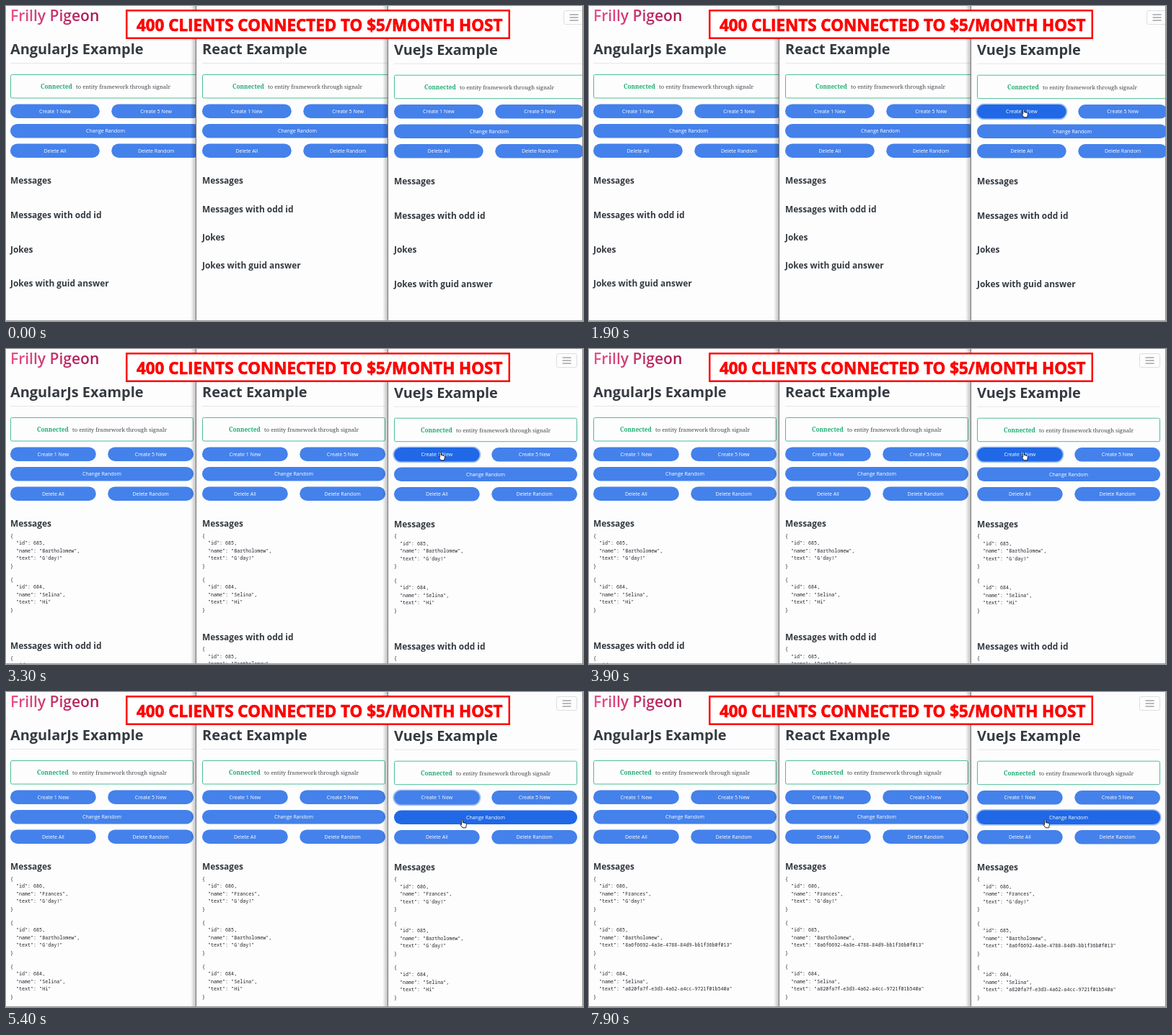
An HTML page with a canvas for the animation above (8 s loop, 800 by 438 pixels).

```html
<!DOCTYPE html>
<html lang="en">
<head>
<meta charset="utf-8">
<title>Live data demo</title>
<style>
html, body { margin: 0; width: 100%; height: 100%; overflow: hidden; background: #fdfdfe; }
canvas { display: block; }
</style>
</head>
<body>
<canvas id="stage" width="800" height="438"></canvas>
<script>
const ctx = document.getElementById('stage').getContext('2d');
const LOOP = 8000;
const SANS = '"Open Sans", "Noto Sans", sans-serif';
const SERIF = '"Noto Serif", "Liberation Serif", serif';
const MONO = '"Noto Sans Mono", "DejaVu Sans Mono", monospace';
const BLUE = '#4481eb', DARK_BLUE = '#2068e6', INK = '#343a40';
const LINE = 10.5, BLOCK = 61.1;

// Times of the clicks and of the resulting updates
const HOVER = 900, ADDED = [2000, 3300, 4700], REACT_BUTTONS = 2700;
const MOVE = 5100, MOVED = 5350, CHANGE = 5700, CHANGE_2 = 7200;

const panels = [
  { title: 'AngularJs Example', x: 0, dy: 0, gap: 47.6, trim: 0 },
  { title: 'React Example', x: 266, dy: 0, gap: 39.3, trim: 4 },
  { title: 'VueJs Example', x: 532, dy: 0.7, gap: 47.6, trim: 0 }
];

function text(str, x, y, font, color, align = 'left') {
  ctx.font = font;
  ctx.fillStyle = color;
  ctx.textAlign = align;
  ctx.fillText(str, x, y);
}

function rect(x, y, w, h, color) {
  ctx.fillStyle = color;
  ctx.fillRect(x, y, w, h);
}

function pill(x, y, w, h, color) {
  ctx.fillStyle = color;
  ctx.beginPath();
  ctx.roundRect(x, y, w, h, h / 2);
  ctx.fill();
}

function button(label, x, y, w, hover, focus) {
  if (focus) pill(x - 1.7, y - 1.7, w + 3.4, 22.9, '#a5c3f5');
  pill(x, y, w, 19.5, hover ? DARK_BLUE : BLUE);
  text(label, x + w / 2, y + 12.3, '7px ' + SANS, '#fff', 'center');
}

function json(fields, x, y) {
  const keys = Object.keys(fields);
  const rows = keys.map((key, i) =>
    `  "${key}": ${JSON.stringify(fields[key])}${i < keys.length - 1 ? ',' : ''}`);
  ['{', ...rows, '}'].forEach((row, i) =>
    text(row, x, y + i * LINE, '6.7px ' + MONO, '#212529'));
}

function sections(t) {
  const count = ADDED.filter(a => t >= a).length;
  const messages = [
    { id: 686, name: 'Frances', text: "G'day!" },
    { id: 685, name: 'Bartholomew',
      text: t < CHANGE ? "G'day!" : '8a6f6692-4a3e-4788-84d9-bb1f36b0f013' },
    { id: 684, name: 'Selina',
      text: t < CHANGE_2 ? 'Hi' : 'a820fa7f-e3d3-4a62-a4cc-9721f01b540a' }
  ].slice(3 - count);
  const joke = { id: 688, leadup: 'Why did the Lion cross the road?',
    punchline: 'To get to the other side!' };
  return [
    ['Messages', messages],
    ['Messages with odd id', messages.filter(m => m.id % 2)],
    ['Jokes', count ? [joke] : []],
    ['Jokes with guid answer', []]
  ];
}

function drawButtons(p, t, x, w) {
  const vue = p.x === 532, half = (w - 16.5) / 2, right = x + half + 16.5;
  const onCreate = vue && t >= HOVER && t < MOVE + 100;
  const onChange = vue && t >= MOVE + 150;
  button('Create 1 New', x, 136.4, half, onCreate,
    vue && t >= ADDED[0] - 200 && t < CHANGE);
  button('Create 5 New', right, 136.4, half);
  button('Change Random', x, 163.9, w, onChange, vue && t >= CHANGE);
  button('Delete All', x, 191.4, half);
  button('Delete Random', right, 191.4, half);
}

function drawPanel(p, t) {
  const left = p.x ? p.x - 2 : 0, x = p.x + 6;
  const wide = t < ADDED[0];
  const w = wide ? 264 : 254;
  const wideButtons = p.x === 266 ? t < REACT_BUTTONS : wide;

  if (p.x) {
    const shade = ctx.createLinearGradient(left - 8, 0, left, 0);
    shade.addColorStop(0, 'rgba(0,0,0,0)');
    shade.addColorStop(1, 'rgba(0,0,0,.28)');
    rect(left - 8, 0, 8, 438, shade);
  }
  rect(left, 0, 800 - left, 438, '#fdfdfe');
  if (p.x) rect(left - 1, 0, 1, 438, '#777');

  ctx.save();
  ctx.translate(0, p.dy);
  text(p.title, x, 67.3, 'bold 19.9px ' + SANS, INK);
  rect(x, 79, w, 1, '#e4e5e7');

  ctx.strokeStyle = '#4dbd94';
  ctx.lineWidth = 1;
  ctx.beginPath();
  ctx.roundRect(x + 0.5, 95.5, w - 1, 32.5, 2);
  ctx.stroke();
  const mid = x + w / 2;
  text('Connected', mid - 90, 115, 'bold 8.2px ' + SERIF, '#20ad73');
  text('to entity framework through signalr', mid + 90, 115, '7.6px ' + SERIF, '#43484d', 'right');

  drawButtons(p, t, x, wideButtons ? 264 : 254);

  let y = 247.4;
  for (const [title, items] of sections(t)) {
    text(title, x, y, 'bold 11.9px ' + SANS, INK);
    items.forEach((item, i) => json(item, x, y + 14.3 + i * BLOCK));
    y += p.gap + (items.length ? items.length * BLOCK - p.trim : 0);
  }
  ctx.restore();
}

function drawHeader(t) {
  const pink = ctx.createLinearGradient(6, 0, 130, 0);
  pink.addColorStop(0, '#ea5189');
  pink.addColorStop(1, '#a3174f');
  text('Frilly Pigeon', 6, 21.3, '600 21px ' + SANS, pink);

  const x = t < ADDED[0] ? 773.5 : 763.5;
  ctx.strokeStyle = '#dddee0';
  ctx.lineWidth = 1;
  ctx.beginPath();
  ctx.roundRect(x, 6.5, 28, 19, 2.5);
  ctx.stroke();
  for (let i = 0; i < 3; i++) rect(x + 8, 11.5 + i * 4, 12, 1, '#77787a');

  rect(166, 5, 533, 41, '#f00');
  rect(168.5, 7.5, 528, 36, '#fff');
  const slogan = '400 CLIENTS CONNECTED TO $5/MONTH HOST';
  text(slogan, 181, 34.8, 'bold 22.4px ' + SANS, '#f00');
  ctx.strokeStyle = '#f00';
  ctx.lineWidth = 0.7;
  ctx.strokeText(slogan, 181, 34.8);
}

const ease = k => k * k * (3 - 2 * k);
function progress(t, a, b) {
  return ease(Math.min(1, Math.max(0, (t - a) / (b - a))));
}

function drawCursor(t) {
  if (t < 500) return;
  const enter = progress(t, 500, 1000), settle = progress(t, 1500, 1800);
  const move = progress(t, MOVE, MOVED);
  const x = 680 - 82 * enter + 2 * settle + 30 * move;
  const y = 438 - 296 * enter + settle + 34 * move;
  ctx.save();
  ctx.translate(x, y);
  ctx.fillStyle = '#fff';
  ctx.strokeStyle = '#111';
  ctx.lineWidth = 0.9;
  ctx.lineJoin = 'round';
  ctx.beginPath();
  ctx.moveTo(1.6, 7.5);
  ctx.lineTo(1.6, 1.4);
  ctx.quadraticCurveTo(2.5, -0.2, 3.4, 1.4);
  ctx.lineTo(3.4, 4.6);
  ctx.lineTo(7.6, 5.4);
  ctx.quadraticCurveTo(8.6, 5.8, 8.5, 7.2);
  ctx.lineTo(7.6, 11.8);
  ctx.lineTo(3, 11.8);
  ctx.lineTo(0, 7.6);
  ctx.quadraticCurveTo(0.2, 6.2, 1.6, 7.5);
  ctx.closePath();
  ctx.fill();
  ctx.stroke();
  ctx.restore();
}

function frame(now) {
  const t = now % LOOP;
  panels.forEach(p => drawPanel(p, t));
  drawHeader(t);
  rect(799, 0, 1, 438, '#888');
  rect(0, 437, 800, 1, '#999');
  drawCursor(t);
  requestAnimationFrame(frame);
}
frame(0);
</script>
</body>
</html>
```
